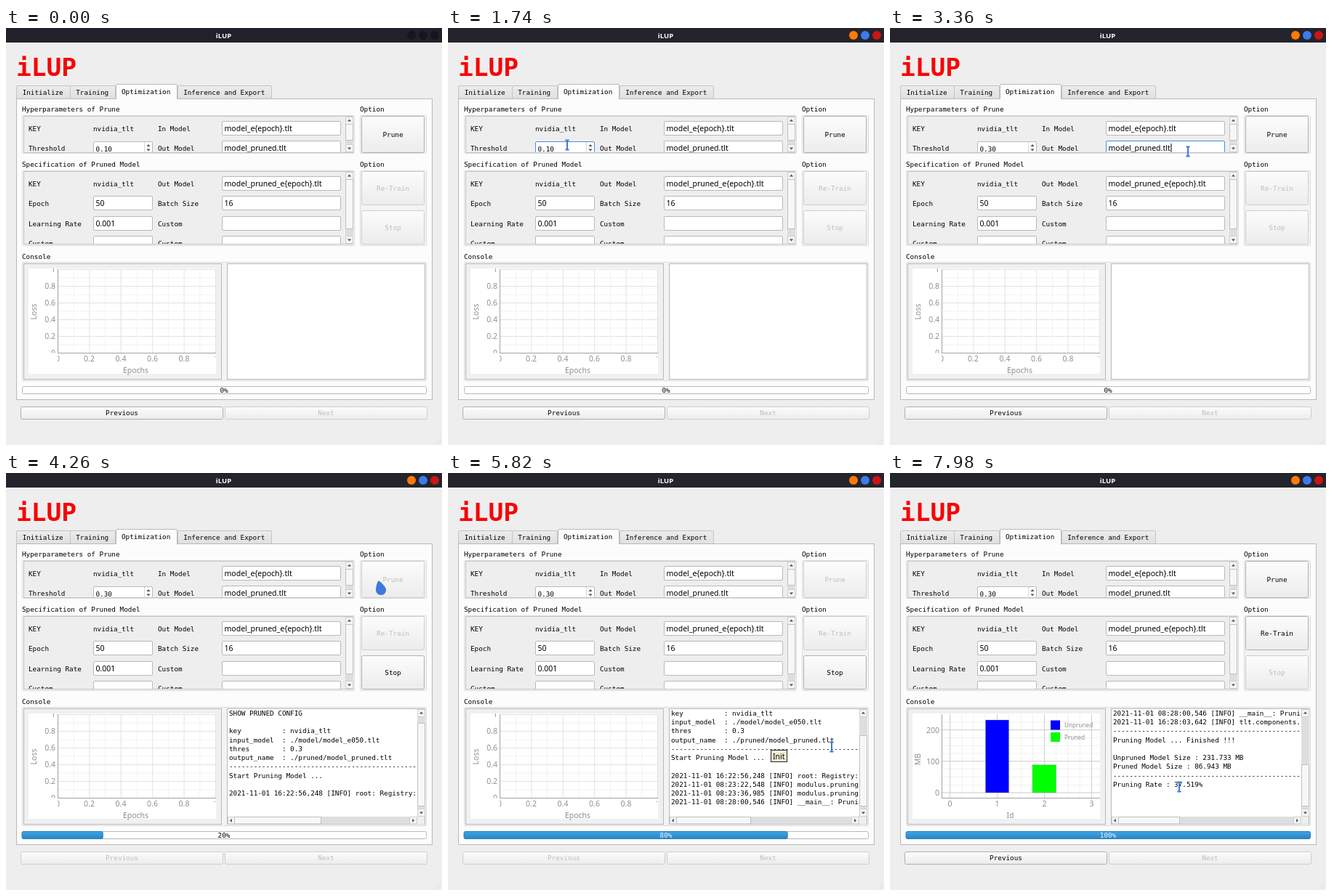
Recreate the animation shown at these times as an HTML page. Size 600 by 574 pixels, loop 8000 ms.

```html
<!DOCTYPE html>
<html lang="en">
<head>
<meta charset="utf-8">
<title>iLUP</title>
<style>
html, body { margin: 0; width: 100%; height: 100%; overflow: hidden; background: #efeeef; }
svg { display: block; width: 100vw; height: 100vh; }
text { white-space: pre; }
.mono { font-family: "DejaVu Sans Mono", monospace; font-size: 9.32px; }
.sans { font-family: "Noto Sans", "Open Sans", sans-serif; font-size: 10.5px; }
.axis { fill: #8b8f93; }
.small { font-size: 8.2px; }
</style>
</head>
<body>
<svg id="stage" viewBox="0 0 600 574" xmlns="http://www.w3.org/2000/svg"></svg>
<script>
const LOOP = 8000;
const BLUE = '#3f79dc', FOCUS = '#4a90d0', EDGE = '#b9b9b9';
const PRUNE_AT = 3900, DONE_AT = 7200;
const stage = document.getElementById('stage');
const $ = id => document.getElementById(id);

// Drawing helpers
const rect = (x, y, w, h, fill, stroke = 'none', more = '') =>
  `<rect x="${x}" y="${y}" width="${w}" height="${h}" fill="${fill}" stroke="${stroke}" ${more}/>`;
const text = (x, y, s, cls = 'mono', more = '') =>
  `<text x="${x}" y="${y}" class="${cls}" ${more}>${s}</text>`;
const mid = 'text-anchor="middle"';
const line = (x1, y1, x2, y2, color) =>
  `<path d="M${x1} ${y1}L${x2} ${y2}" stroke="${color}"/>`;
const clip = (id, x, y, w, h) => `<clipPath id="${id}">${rect(x, y, w, h, '#000')}</clipPath>`;
const clipped = (id, body) => `<g clip-path="url(#${id})">${body}</g>`;
const arrow = (x, y, turn) =>
  `<path d="M-2.6 1.4L0 -1.6L2.6 1.4Z" fill="#555" transform="translate(${x} ${y}) rotate(${turn})"/>`;

const frame = (x, y, w, h) =>
  rect(x + .5, y + .5, w - 1, h - 1, '#f3f3f3', '#dcdcdc', 'rx="1"');
const field = (x, y, w, s = '', id = '', cls = 'sans') =>
  rect(x + .5, y + .5, w - 1, 19, '#fff', EDGE, `rx="1.5" ${id && `id="${id}Box"`}`) +
  text(x + 3.5, y + 14, s, cls, id && `id="${id}"`);
const button = (id, x, y, w, h, label) =>
  rect(x + .5, y + .5, w - 1, h - 1, 'url(#btn)', EDGE, `rx="2" id="${id}Box"`) +
  text(x + w / 2, y + h / 2 + 3.4, label, 'mono', `${mid} id="${id}"`);
const tab = (x, w, label) =>
  rect(x + .5, 79.5, w, 18, 'url(#tab)', '#c4c4c4', 'rx="1.5"') +
  text(x + w / 2 - .3, 91.5, label, 'mono', mid);

function vScroll(x, top, bottom, from, to) {
  return rect(x, top, 11, bottom - top, '#dedede') +
    rect(x + .5, top + .5, 10, 10, '#f5f5f5', '#cfcfcf') + arrow(x + 5.5, top + 5, 0) +
    rect(x + .5, bottom - 10.5, 10, 10, '#f5f5f5', '#cfcfcf') + arrow(x + 5.5, bottom - 5, 180) +
    rect(x + .5, from + .5, 10, to - from, '#f7f7f7', '#c0c0c0');
}

function lossChart() {
  let s = '';
  for (let i = 0; i <= 10; i++) {
    const c = i % 2 ? '#f2f2f2' : '#e2e2e2';
    const x = 71.5 + i * 21.7, y = 447.5 - i * 11.5;
    s += line(x, 332, x, 447, c) + line(71, y, 289, y, c);
  }
  s += line(71.5, 332, 71.5, 448, '#a2a2a2') + line(71, 447.5, 289, 447.5, '#a2a2a2');
  let ys = '', xs = '';
  for (let i = 0; i <= 5; i++) {
    const n = i / 5;
    ys += text(68, 451 - i * 23, n, 'sans axis', 'text-anchor="end"');
    xs += text(71 + i * 43.5, 459, n, 'sans axis', mid);
  }
  return s + clipped('yLabels', ys) + clipped('xLabels', xs) +
    text(0, 0, 'Loss', 'sans axis', `${mid} transform="translate(41.5 390.5) rotate(-90)"`) +
    text(178.5, 475, 'Epochs', 'sans axis', mid);
}

function sizeChart() {
  let s = '';
  for (let x = 82.5; x < 289; x += 16.25) s += line(x, 332, x, 447, '#f0f0f0');
  for (let y = 440; y > 332; y -= 10.8) s += line(71, y, 289, y, '#f0f0f0');
  for (let i = 0; i < 4; i++) {
    const x = 82.5 + i * 65;
    s += line(x, 332, x, 447, '#cfcfcf') + text(x, 459, i, 'sans axis', mid);
  }
  for (let i = 0; i < 3; i++) {
    const y = 440 - i * 43.2;
    s += line(71, y, 289, y, '#cfcfcf') +
      text(68, y + 4, i * 100, 'sans axis', 'text-anchor="end"');
  }
  const edge = 'stroke-dasharray="1 1" stroke-opacity=".6"';
  s += line(71.5, 332, 71.5, 448, '#a2a2a2') + line(71, 447.5, 289, 447.5, '#a2a2a2');
  s += rect(131.5, 340, 32, 100, '#00f', '#888', edge) + rect(196, 401.7, 32.5, 38.3, '#0f0', '#888', edge);
  s += rect(221, 340.5, 13, 13, '#00f') + text(240, 350.3, 'Unpruned', 'sans axis small');
  s += rect(221, 357, 13, 13, '#0f0') + text(240, 367, 'Pruned', 'sans axis small');
  return s +
    text(0, 0, 'MB', 'sans axis', `${mid} transform="translate(41.5 394) rotate(-90)"`) +
    text(165.5, 475, 'Id', 'sans axis', mid);
}

const gradient = (id, a, b) =>
  `<linearGradient id="${id}" x2="0" y2="1"><stop stop-color="${a}"/><stop offset="1" stop-color="${b}"/></linearGradient>`;

stage.innerHTML = `<defs>
  ${gradient('btn', '#fcfcfc', '#ececec')}${gradient('tab', '#ececec', '#e0e0e0')}${gradient('fill', '#3fa4e2', '#2a86c8')}
  ${clip('prunePane', 24, 122, 443, 48.7)}${clip('specPane', 24, 198, 443, 99)}
  ${clip('yLabels', 45, 331, 26, 116.5)}${clip('xLabels', 71, 448, 217, 14)}
  ${clip('logPane', 305, 325, 261, 148)}</defs>` +
  rect(0, 0, 600, 574, '#efeeef') +
  rect(0, 0, 600, 20, '#23242c', 'none', 'id="bar"') +
  text(299.5, 13.6, 'iLUP', 'sans', `${mid} fill="#fff" style="font-size:9.5px;font-weight:700"`) +
  [558, 574, 590].map((x, i) => `<circle id="dot${i}" cx="${x}" cy="10" r="6"/>`).join('') +
  text(14, 66, 'iLUP', 'mono', 'fill="#f80404" style="font-size:34.5px;font-weight:700"') +
  tab(14, 74, 'Initialize') + tab(88, 62, 'Training') + tab(236, 129, 'Inference and Export') +
  rect(14.5, 97.5, 572, 414, '#fcfcfc', EDGE) +
  `<path d="M151.5 98V79q0-1.5 1.5-1.5H234q1.5 0 1.5 1.5V98" fill="#fcfcfc" stroke="${EDGE}"/>` +
  text(192.6, 90.7, 'Optimization', 'mono', mid) +

  text(22, 114.5, 'Hyperparameters of Prune') + text(487, 114.5, 'Option') +
  frame(22, 120, 458, 53) + rect(24.5, 121.5, 453, 50, '#efeeef', '#c6c6c6') +
  clipped('prunePane',
    text(31, 142, 'KEY') + text(120, 142, 'nvidia_tlt') + text(209, 142, 'In Model') +
    field(297, 128, 164, 'model_e{epoch}.tlt') +
    text(31, 169, 'Threshold') + field(120, 156, 82, '0.10', 'thres', 'mono') +
    line(190.5, 157, 190.5, 172, '#d5d5d5') + arrow(196, 161.5, 0) + arrow(196, 168, 180) +
    text(209, 169, 'Out Model') + field(297, 155, 164, 'model_pruned.tlt', 'out') +
    rect(386.5, 159, 1, 12, '#000', 'none', 'id="caret"')) +
  vScroll(467, 122, 171, 132, 154) +
  frame(487, 120, 92, 53) + button('prune', 489, 121, 87, 51, 'Prune') +

  text(22, 190.5, 'Specification of Pruned Model') + text(487, 190.5, 'Option') +
  frame(22, 196, 458, 104) + rect(24.5, 197.5, 453, 100, '#efeeef', '#c6c6c6') +
  clipped('specPane', [
    ['KEY', '', 'Out Model', 'model_pruned_e{epoch}.tlt'],
    ['Epoch', '50', 'Batch Size', '16'],
    ['Learning Rate', '0.001', 'Custom', ''],
    ['Custom', '', 'Custom', '']
  ].map(([a, v, b, w], i) => {
    const y = Math.round(204 + i * 27.3);
    return text(31, y + 14, a) + (i ? field(120, y, 82, v) : text(120, y + 14, 'nvidia_tlt')) +
      text(209, y + 14, b) + field(297, y, 164, w);
  }).join('')) +
  vScroll(467, 198, 297, 208, 276) +
  frame(487, 196, 92, 104) +
  button('retrain', 489, 197, 87, 47, 'Re-Train') + button('stop', 489, 251, 87, 47, 'Stop') +

  text(22, 317.5, 'Console') +
  frame(22, 322, 557, 164) + rect(24.5, 324.5, 272, 159, '#f0f0f0', EDGE) +
  rect(31, 331, 258, 145, '#fff') +
  `<g id="loss">${lossChart()}</g><g id="size">${sizeChart()}</g>` +
  rect(304.5, 324.5, 272, 159, '#fff', EDGE) + clipped('logPane', '<g id="log"></g>') + '<g id="bars"></g>' +

  rect(22.5, 493.5, 556, 10, '#fff', EDGE, 'rx="2"') +
  rect(22, 493.5, 0, 10, 'url(#fill)', '#2b7fbd', 'rx="2" id="progress"') +
  text(300, 502.2, '0%', 'mono', `${mid} id="percent"`) +
  button('prev', 20, 521, 279, 18, 'Previous') + button('next', 301, 521, 279, 18, 'Next') +
  '<path d="M590 573l9-9M594 573l5-5" stroke="#e0e0e0"/>' +
  `<g id="tip">${rect(444.5, 381.5, 22, 16, '#f4ebd7', '#222')}${text(455.2, 393.6, 'Init', 'sans', mid)}</g>` +
  `<path id="pointer" d="M3.5 -.8C7 1 13.5 7 14 11.5C14 16 11 19 7.5 19C3 19 -.5 16 0 10.5C.5 6 1.5 2 3.5 -.8Z" fill="${BLUE}"/>` +
  `<path id="beam" d="M-2.6 -6.6H2.6M0 -6.6V6.6M-2.6 6.6H2.6" fill="none" stroke="${BLUE}" stroke-width="2"/>`;

const RULE = '-'.repeat(72);
const LOG = [
  'SHOW PRUNED CONFIG', '',
  'key          : nvidia_tlt',
  'input_model  : ./model/model_e050.tlt',
  'thres        : 0.3',
  'output_name  : ./pruned/model_pruned.tlt',
  RULE, 'Start Pruning Model ...', '',
  '2021-11-01 16:22:56,248 [INFO] root: Registry:',
  '2021-11-01 08:23:22,548 [INFO] modulus.pruning',
  '2021-11-01 08:23:36,985 [INFO] modulus.pruning',
  '2021-11-01 08:28:00,546 [INFO] __main__: Pruning',
  '2021-11-01 16:28:03,642 [INFO] tlt.components.',
  RULE, 'Pruning Model ... Finished !!!', '',
  'Unpruned Model Size : 231.733 MB',
  'Pruned Model Size : 86.943 MB',
  RULE, 'Pruning Rate : 37.519%'
];

// [start, percent, lines printed, first visible line, width of the bottom slider]
const STEPS = [
  [0, 0, 0, 0, 0],
  [PRUNE_AT, 0, 9, 0, 119],
  [4140, 20, 10, 0, 119],
  [4740, 40, 11, 0, 102],
  [5160, 60, 12, 1, 102],
  [5580, 80, 13, 2, 102],
  [6420, 100, 14, 3, 102],
  [DONE_AT, 100, 21, 12, 84]
];

// [time, x, y] of the mouse
const PATH = [
  [360, 330, 545], [900, 240, 330], [1380, 164, 161], [1740, 164, 161],
  [1920, 195, 161], [2400, 195, 161], [2880, 380, 178], [3180, 410, 170],
  [3420, 410, 170], [3780, 509, 149], [4380, 509, 149], [4860, 442, 363],
  [5640, 442, 363], [5820, 528, 377], [6300, 547, 402], [7200, 547, 402],
  [7800, 398, 432], [8000, 398, 432]
];
const TEXT_AREAS = [[297, 128, 461, 148], [120, 156, 190, 171], [297, 155, 461, 177],
  [120, 232, 202, 279], [297, 204, 461, 297], [304, 324, 566, 473]];

function mouseAt(t) {
  const i = PATH.findIndex(p => p[0] > t);
  if (i < 1) return null;
  const [a, x, y] = PATH[i - 1], [b, u, v] = PATH[i];
  const k = (t - a) / (b - a), e = k * k * (3 - 2 * k);
  return [x + (u - x) * e, y + (v - y) * e];
}

const show = (id, on) => $(id).setAttribute('display', on ? 'inline' : 'none');
const paint = (id, color, attr = 'fill') => $(id).setAttribute(attr, color);
function enable(id, on) {
  paint(id, on ? '#000' : '#bebebe');
  paint(id + 'Box', on ? '#b0b0b0' : '#cecece', 'stroke');
}

function drawConsole([, , count, first, slider]) {
  $('log').innerHTML = LOG.slice(first, count).map((s, i) => text(307, 333.8 + i * 12.25, s)).join('');
  if (!count) { $('bars').innerHTML = ''; return; }
  const top = 458 - 124 * 11 / (12 + first);
  $('bars').innerHTML = vScroll(566, 325, 473, Math.round(top), 458) +
    rect(305, 473, 271, 10.5, '#dedede') +
    rect(305.5, 473.5, 9, 9.5, '#f5f5f5', '#cfcfcf') + arrow(309.5, 478.3, -90) +
    rect(555.5, 473.5, 9.5, 9.5, '#f5f5f5', '#cfcfcf') + arrow(560.5, 478.3, 90) +
    rect(314.5, 473.5, slider, 9.5, '#f7f7f7', '#c0c0c0') +
    rect(566, 473, 10, 10.5, '#efeeef');
}

let lastStep;
function render(t) {
  const active = t >= 1440, running = t >= PRUNE_AT && t < DONE_AT, done = t >= DONE_AT;
  paint('bar', active ? '#23242c' : '#20212a');
  ['#ff7a08', '#3a7bf0', '#cc1515'].forEach((c, i) => paint('dot' + i, active ? c : '#15161c'));

  $('thres').textContent = t < 2010 ? '0.10' : t < 2160 ? '0.20' : '0.30';
  const editing = t >= 3240 && t < PRUNE_AT;
  paint('thresBox', active && t < 3240 ? FOCUS : EDGE, 'stroke');
  paint('outBox', editing ? FOCUS : EDGE, 'stroke');
  show('caret', editing);

  enable('prune', !running);
  enable('retrain', done);
  enable('stop', running);
  enable('prev', !running);
  enable('next', false);
  show('loss', !done);
  show('size', done);

  const step = STEPS.filter(s => s[0] <= t).pop();
  if (step !== lastStep) drawConsole(lastStep = step);
  const percent = step[1];
  $('progress').setAttribute('width', percent * 5.565);
  show('progress', percent > 0);
  $('percent').textContent = percent + '%';
  paint('percent', percent > 50 ? '#f4f8fc' : '#000');

  show('tip', t >= 5520 && t < 7300);
  const m = mouseAt(t);
  const overText = m && TEXT_AREAS.some(([x, y, u, v]) => m[0] >= x && m[0] <= u && m[1] >= y && m[1] <= v);
  show('beam', m && overText);
  show('pointer', m && !overText);
  if (m) $(overText ? 'beam' : 'pointer').setAttribute('transform', `translate(${m[0]} ${m[1]})`);
}

const start = performance.now();
function tick() {
  render((performance.now() - start) % LOOP);
  requestAnimationFrame(tick);
}
tick();
</script>
</body>
</html>
```
